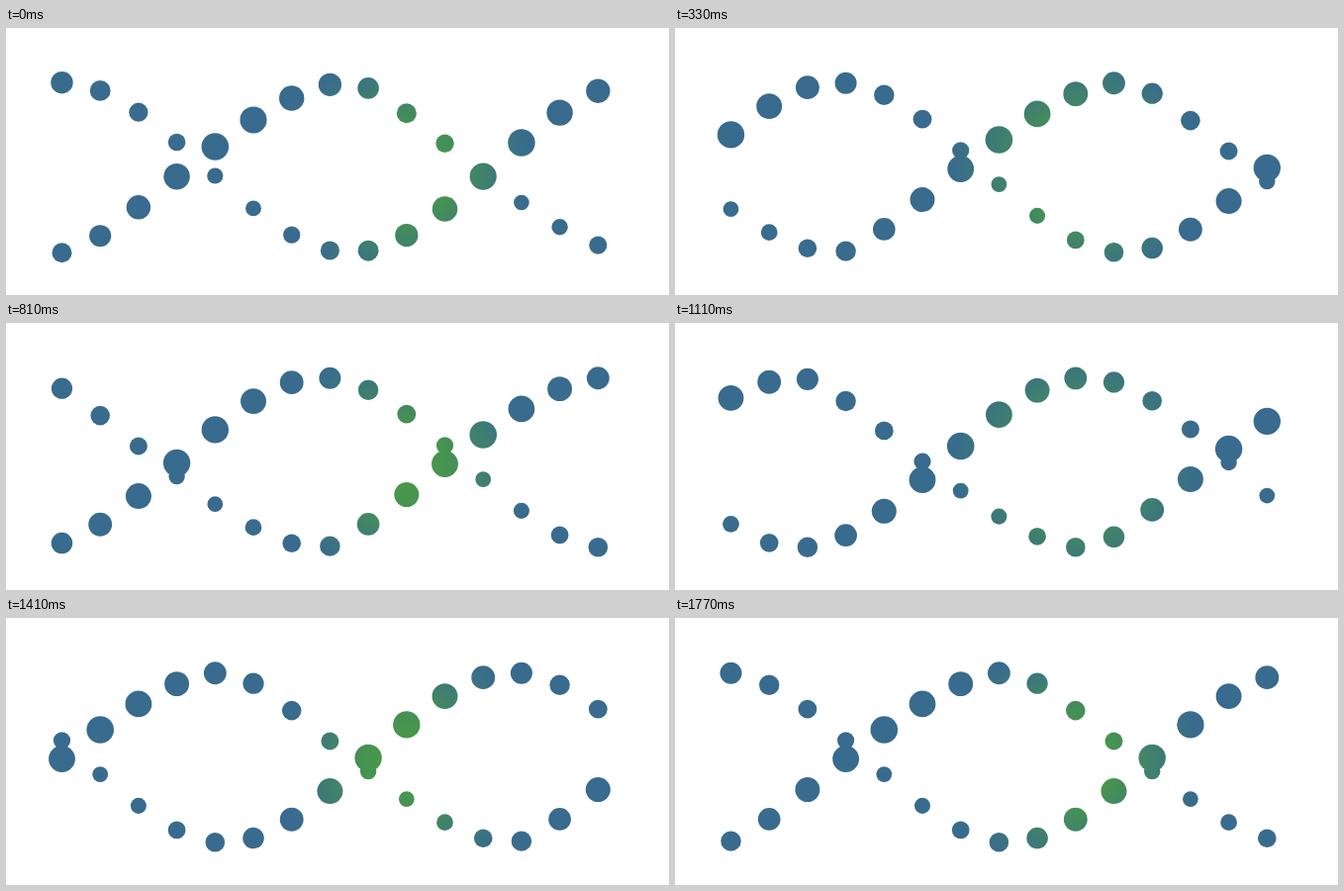
Animation of 670 by 270 pixels, one loop 1.8 s. Source, as an HTML page:

```html
<!DOCTYPE html>
<html lang="en">
<head>
<meta charset="utf-8">
<title>Double helix of dots</title>
<style>
  html, body { margin: 0; width: 100%; height: 100%; overflow: hidden; background: #fff; }
  svg { display: block; width: 670px; height: 270px; }

  circle {
    fill: #fff;
    animation-duration: 1800ms;
    animation-iteration-count: infinite;
    animation-delay: var(--move), var(--size);
  }
  .fall { animation-name: fall, swell; }
  .rise { animation-name: rise, swell; }

  @keyframes fall {
    0%, 100% { cy: 55.2px; animation-timing-function: cubic-bezier(.333, 0, .667, 1); }
    50% { cy: 227.3px; animation-timing-function: cubic-bezier(.333, 0, .667, 1); }
  }
  @keyframes rise {
    0%, 100% { cy: 227.3px; animation-timing-function: cubic-bezier(.333, 0, .833, 1); }
    50% { cy: 55.2px; animation-timing-function: cubic-bezier(.333, 0, .833, 1); }
  }
  /* nearest to the viewer at 21.7%, farthest at 70% */
  @keyframes swell {
    0% { r: 11.2px; animation-timing-function: cubic-bezier(.333, .333, .667, 1); }
    21.667% { r: 13.8px; animation-timing-function: cubic-bezier(.333, 0, .667, .667); }
    50% { r: 10px; animation-timing-function: cubic-bezier(.333, .333, .667, 1); }
    70% { r: 7.8px; animation-timing-function: cubic-bezier(.2, .1, .667, .667); }
    100% { r: 11.2px; }
  }
</style>
</head>
<body>
<svg viewBox="0 0 670 270">
  <defs>
    <radialGradient id="glow" gradientUnits="userSpaceOnUse" cx="404.5" cy="145" r="125">
      <stop offset=".12" stop-color="#48994a"/>
      <stop offset=".32" stop-color="#46944f"/>
      <stop offset=".48" stop-color="#438a5f"/>
      <stop offset=".72" stop-color="#3d7a76"/>
      <stop offset="1" stop-color="#386b8d"/>
    </radialGradient>
    <mask id="dots" maskUnits="userSpaceOnUse" x="0" y="0" width="670" height="270"></mask>
  </defs>
  <rect width="670" height="270" fill="url(#glow)" mask="url(#dots)"/>
</svg>
<script>
  const LOOP = 1800, COLUMNS = 15, LEFT = 56.5, GAP = 38.7;
  const dots = document.getElementById('dots');

  function addDot(column, strand, sizeShift) {
    const dot = document.createElementNS('http://www.w3.org/2000/svg', 'circle');
    const delay = column * LOOP / COLUMNS - LOOP;
    dot.setAttribute('class', strand);
    dot.setAttribute('cx', LEFT + column * GAP);
    dot.style.setProperty('--move', delay + 'ms');
    dot.style.setProperty('--size', delay - sizeShift + 'ms');
    dots.append(dot);
  }

  for (let i = 0; i < COLUMNS; i++) {
    addDot(i, 'fall', 0);
    addDot(i, 'rise', LOOP / 2);
  }
</script>
</body>
</html>
```
